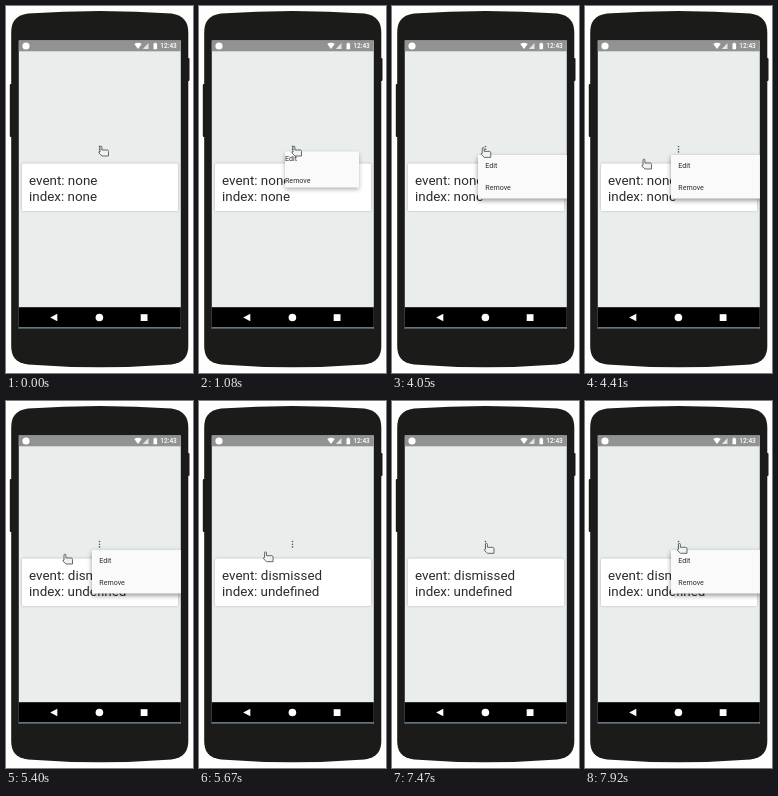
Write an HTML page that moves like this. It is 187 by 367 pixels and loops after 8 s.

```html
<!DOCTYPE html>
<html lang="en">
<head>
<meta charset="utf-8">
<title>Popup menu demo</title>
<style>
  html, body { margin: 0; height: 100%; overflow: hidden; background: #fefefe; }
  svg { display: block; width: 187px; height: 367px; font-family: Roboto, sans-serif; }
  .card { fill: #fff; filter: drop-shadow(0 .6px .9px rgba(0,0,0,.25)); }
  .label { font-size: 13.4px; fill: #2c2c2c; }
  #panel { fill: #fafafa; }
  #menu text { font-size: 7.1px; fill: #2c2c2c; }
</style>
</head>
<body>
<svg viewBox="0 0 187 367">
  <defs>
    <clipPath id="screen"><rect x="12.8" y="34.5" width="162" height="288.500"/></clipPath>
  </defs>
  <g fill="#1b1b19">
    <rect x="3.800" y="78" width="4" height="53" rx="1"/>
    <rect x="179.500" y="52" width="4" height="23" rx="1"/>
    <path d="M5.200 27C5.200 16 9 9.500 22 7.500Q93.500 2.500 165.500 7.500C178 9.500 182.300 16 182.300 27V340C182.300 350 178 356.500 165.500 358.500Q93.500 364 22 358.500C9 356.500 5.200 350 5.200 340Z"/>
  </g>
  <g clip-path="url(#screen)">
    <rect x="12" y="34" width="163" height="290" fill="#e9eeed"/>
    <rect x="12" y="34" width="163" height="11.300" fill="#919392"/>
    <g fill="#fff">
      <circle cx="20" cy="40" r="3.600"/>
      <path d="M128.300 38Q132 35.500 135.700 38L132 43Z"/>
      <path d="M142.500 37V43H136.800Z" opacity=".75"/>
      <path d="M147.500 37.500h1v-.8h1.600v.8h1v5.800h-3.600z"/>
      <text x="154.300" y="42.400" font-size="6.500" font-weight="500">12:43</text>
    </g>
    <rect x="12" y="301.200" width="163" height="20" fill="#000"/>
    <rect x="12" y="321.300" width="163" height="2" fill="#485760"/>
    <g fill="#fff">
      <path d="M44.200 311.500L51.300 307.700V315.300Z"/>
      <circle cx="93.400" cy="311.500" r="3.800"/>
      <rect x="134.700" y="308.200" width="6.800" height="6.800"/>
    </g>
    <g fill="#555">
      <circle cx="93.500" cy="140.500" r=".8"/>
      <circle cx="93.500" cy="143.200" r=".8"/>
      <circle cx="93.500" cy="145.900" r=".8"/>
    </g>
    <rect class="card" x="16" y="157.500" width="156" height="47.500" rx="1.500"/>
    <text class="label" id="event" x="23" y="178.800"></text>
    <text class="label" id="index" x="23" y="194.500"></text>
    <g id="menu">
      <rect id="panel" x="86" rx="1"/>
      <text id="edit">Edit</text>
      <text id="remove">Remove</text>
    </g>
  </g>
  <path id="hand" d="M2 6.500V1.600a.95 .95 0 0 1 1.900 0V4.500H9.200Q10.500 4.600 10.500 6V10.500H4L.9 7.500Q.6 6.300 2 6.500Z"
        fill="#eff2f2" stroke="#505050" stroke-width=".85" stroke-linejoin="round"/>
</svg>
<script>
const LOOP = 8000, TICK = 90;
const $ = id => document.getElementById(id);
const mix = (a, b, p) => a + (b - a) * p;
const span = (t, from, to) => Math.min(1, Math.max(0, (t - from) / (to - from)));
const smooth = p => p * p * (3 - 2 * p);
const easeOut = p => 1 - (1 - p) ** 2;

function set(id, attrs) {
  for (const name in attrs) $(id).setAttribute(name, attrs[name]);
}

function drawMenu(t) {
  const reopened = t >= 7650;
  const open = (t >= 1080 && t < 5670) || reopened;
  set('menu', { visibility: open ? 'visible' : 'hidden', opacity: t >= 5490 && !reopened ? .88 : 1 });
  if (!open) return;
  const age = t - (reopened ? 7650 : 1080);
  const p = 1 - .12 ** (age / TICK);
  set('panel', {
    y: mix(145.5, 149, p), width: mix(74, 90, p), height: mix(36, 43.5, p),
    style: `filter: drop-shadow(0 2px ${mix(2, 2.8, p)}px rgba(0,0,0,${mix(.3, .42, p)}))`
  });
  set('edit', { x: mix(86, 93.3, p), y: mix(155, 162.2, p) });
  set('remove', { x: mix(86, 93.3, p), y: mix(176.5, 183.7, p) });
}

function drawHand(t) {
  const away = smooth(span(t, 3960, 4410));
  const back = easeOut(span(t, 5580, 6390));
  const settle = span(t, 6390, 6570);
  const x = mix(mix(92, 56, away), 92, back) - .5 * settle;
  const y = mix(mix(139.5, 152.5, away), 141.5, back) + .3 * settle;
  set('hand', { transform: `translate(${x} ${y})` });
}

function frame(now) {
  const t = Math.floor((now % LOOP) / TICK) * TICK;
  const dismissed = t >= 5400;
  $('event').textContent = 'event: ' + (dismissed ? 'dismissed' : 'none');
  $('index').textContent = 'index: ' + (dismissed ? 'undefined' : 'none');
  drawMenu(t);
  drawHand(t);
  requestAnimationFrame(frame);
}
frame(performance.now());
</script>
</body>
</html>
```
